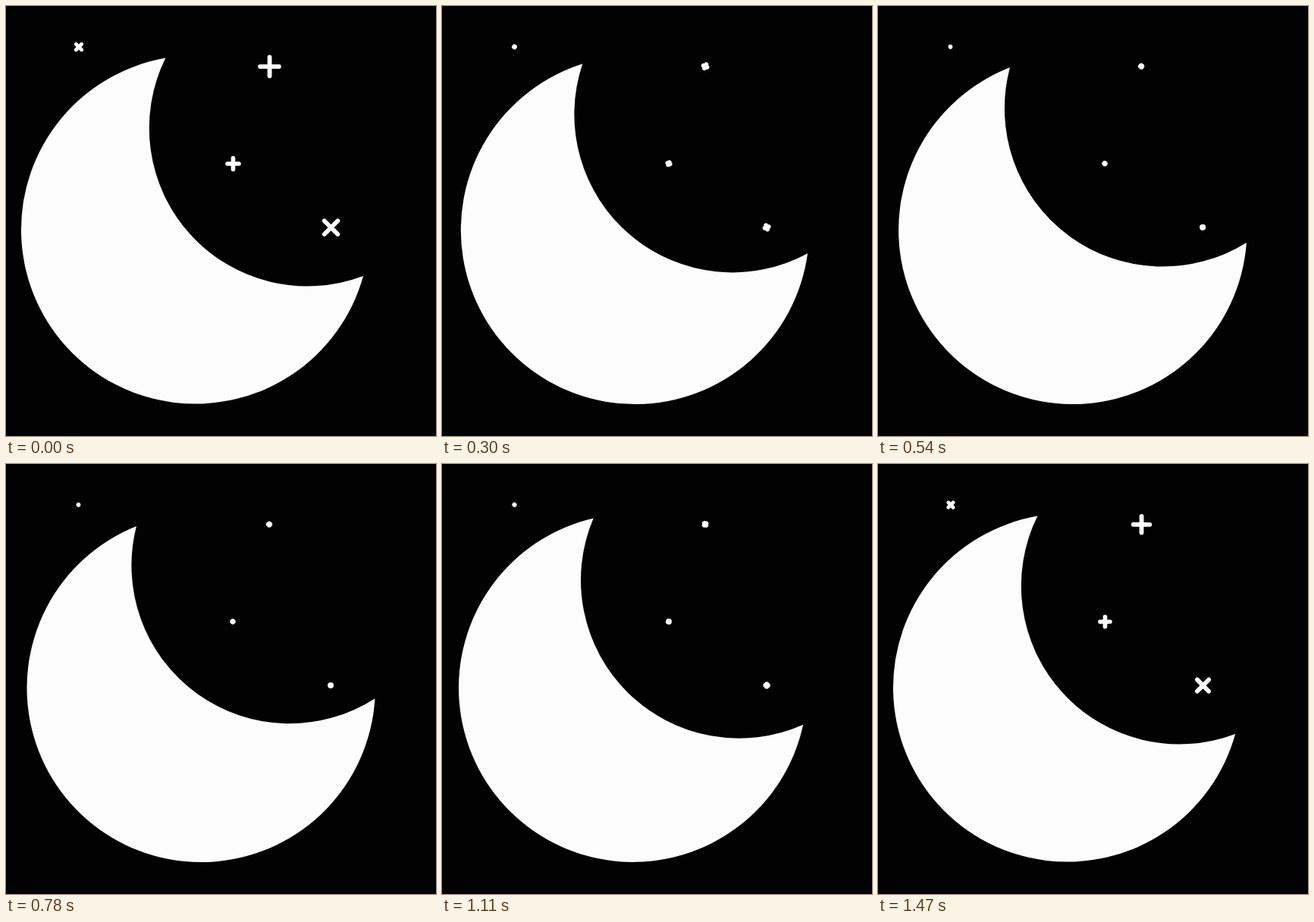
An HTML page that plays this animation: 567 by 567 pixels, repeating every 1.5 s.

```html
<!DOCTYPE html>
<html lang="en">
<head>
<meta charset="utf-8">
<title>Moon and stars</title>
<style>
  html, body { margin: 0; width: 100%; height: 100%; overflow: hidden; background: #020202; }
  svg { display: block; width: 100%; height: 100%; }
  .star { fill: none; stroke: #fff; stroke-linecap: round; }
</style>
</head>
<body>
<svg id="sky" viewBox="0 0 567 567">
  <path id="moon" fill="#fcfcfc"
    d="M210.4 68.6A208.5 208.5 0 0 0 471.1 356A229.7 229.7 0 1 1 210.4 68.6Z"/>
</svg>
<script>
const LOOP = 1500, HALF = LOOP / 2, STEP = 30;
const TILT = -12, PIVOT = '255.4 259', SPIN = 180;

// x, y, arm length, arm length when closed, stroke, resting angle
const stars = [
  [347.6, 79.8, 25, 2.5, 5.8, 0],
  [299.5, 208, 15, 2, 5.6, 0],
  [428.6, 292.1, 25, 2.5, 5.8, 45],
  [96, 54, 10.5, 1.2, 4.8, 45]
];

const sky = document.getElementById('sky');
const moon = document.getElementById('moon');

const shapes = stars.map(([, , , , width]) => {
  const el = document.createElementNS('http://www.w3.org/2000/svg', 'path');
  el.setAttribute('class', 'star');
  el.setAttribute('stroke-width', width);
  return sky.appendChild(el);
});

// Cubic bezier from (0,0) to (1,1) with handles (x1,0) and (x2,1)
function bezier(x1, x2) {
  return t => {
    let lo = 0, hi = 1, s = t;
    for (let i = 0; i < 24; i++) {
      s = (lo + hi) / 2;
      const r = 1 - s;
      const x = 3 * r * r * s * x1 + 3 * r * s * s * x2 + s * s * s;
      if (x < t) lo = s; else hi = s;
    }
    return s * s * (3 - 2 * s);
  };
}
const easeOut = bezier(0.25, 0.27);
const easeBack = bezier(0.36, 0.25);

function draw(ms) {
  const u = ms / HALF;
  const turn = u < 1 ? easeOut(u) : 1 - easeBack(u - 1);
  const open = Math.abs(1 - u) ** 4;

  moon.setAttribute('transform', `rotate(${TILT * turn} ${PIVOT})`);
  stars.forEach(([x, y, long, short, , rest], i) => {
    const arm = (short + (long - short) * open) / 2;
    const drift = -0.5 * (1 - open);
    shapes[i].setAttribute('d', `M${-arm} 0H${arm}M0 ${-arm}V${arm}`);
    shapes[i].setAttribute('transform',
      `translate(${x + drift} ${y + drift / 2}) rotate(${rest + SPIN * turn})`);
  });
}

const start = performance.now();
function tick(now) {
  const ms = Math.max(0, now - start) % LOOP;
  draw(Math.floor(ms / STEP) * STEP);
  requestAnimationFrame(tick);
}
draw(0);
requestAnimationFrame(tick);
</script>
</body>
</html>
```
